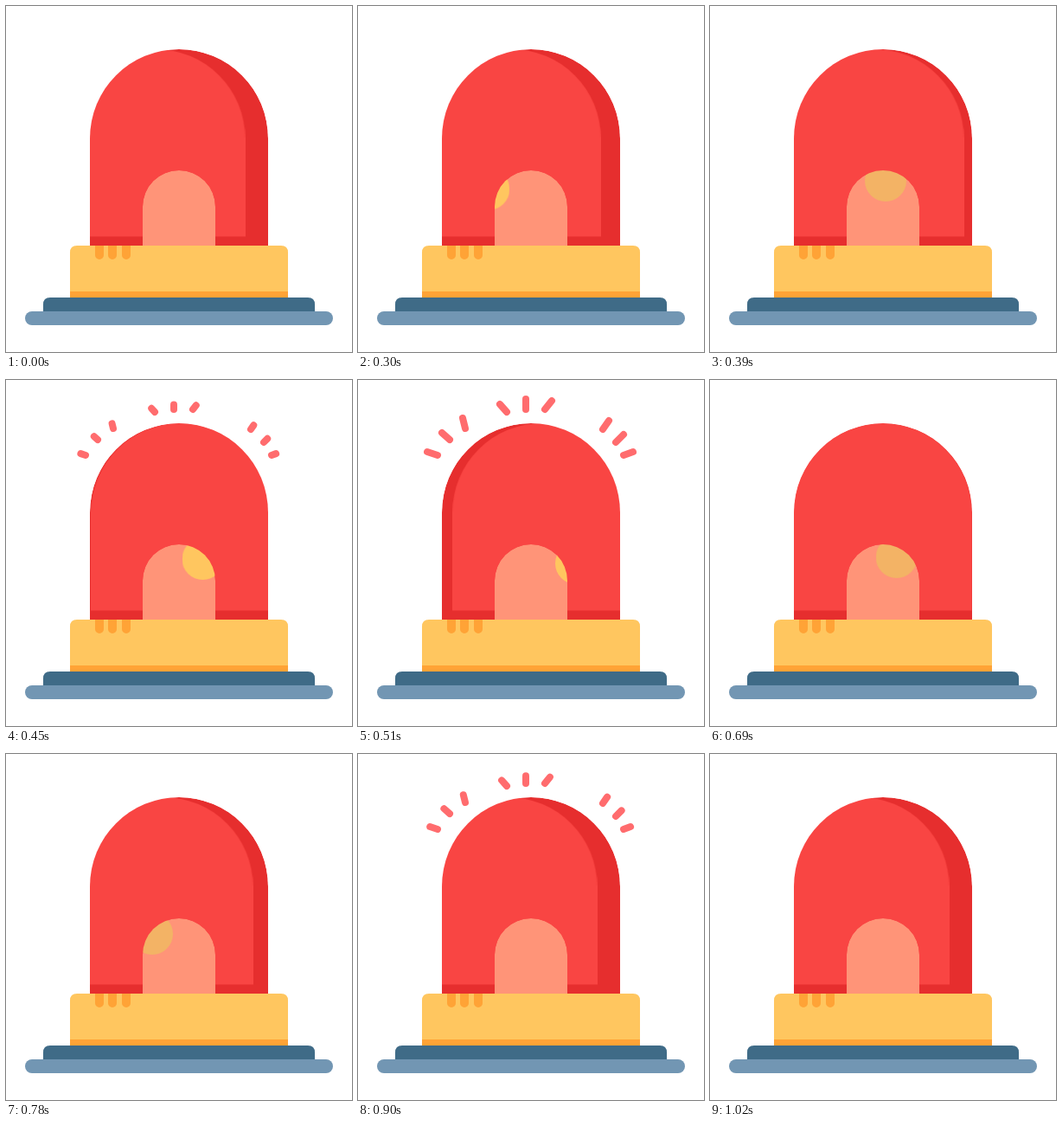
Recreate the animation shown at these times as an HTML page. Size 400x400 px, loop 1.83 s.

```html
<!DOCTYPE html>
<html lang="en">
<head>
<meta charset="utf-8">
<title>Siren</title>
<style>
  html, body { margin: 0; width: 100%; height: 100%; overflow: hidden; background: #fff; }
  svg { display: block; width: 100%; height: 100%; }

  /* The motion advances in 30 ms ticks, 61 per loop. */
  .glass, .lamp, .rays { animation: 1830ms linear -1ms infinite; }
  .glass { animation-name: turn; }
  .lamp { animation-name: sweep, blink; }
  .rays {
    animation-name: burst, show;
    fill: none;
    stroke: #ff6c6e;
    stroke-width: 8;
    stroke-linecap: round;
    stroke-dasharray: 1 2;
  }

  @keyframes turn {
    0% { transform: translateX(-26.5px); }
    14.75% { transform: translateX(-26.5px); animation-timing-function: steps(4); }
    21.31% { transform: translateX(-9.5px); animation-timing-function: steps(4); }
    27.86% { transform: translateX(12.2px); animation-timing-function: steps(2); }
    31.14% { transform: translateX(20px); animation-timing-function: steps(2); }
    34.42% { transform: translateX(11.2px); animation-timing-function: steps(5); }
    42.62% { transform: translateX(-17.5px); animation-timing-function: steps(2); }
    45.9%, 100% { transform: translateX(-26.5px); }
  }

  @keyframes sweep {
    0% { transform: translate(134px, 215px); }
    14.75% { transform: translate(134px, 215px); animation-timing-function: steps(4); }
    21.31% { transform: translate(203px, 202px); animation-timing-function: steps(4); }
    27.86% { transform: translate(252px, 212px); animation-timing-function: steps(2); }
    31.14% { transform: translate(268px, 215px); animation-timing-function: steps(2); }
    34.42% { transform: translate(247px, 211px); animation-timing-function: steps(3); }
    39.34% { transform: translate(200px, 202px); animation-timing-function: steps(2); }
    42.62% { transform: translate(169px, 208px); animation-timing-function: steps(2); }
    45.9%, 100% { transform: translate(134px, 215px); }
  }

  @keyframes blink {
    0%, 24.59% { fill: #ffc65f; animation-timing-function: step-end; }
    19.67%, 31.14% { fill: #f3b365; animation-timing-function: step-end; }
    100% { fill: #f3b365; }
  }

  /* Each ray grows outwards, then leaves from its inner end. */
  @keyframes burst {
    0%, 22.95% { stroke-dashoffset: .8; animation-timing-function: steps(3); }
    27.86% { stroke-dashoffset: 0; animation-timing-function: steps(3); }
    32.78% { stroke-dashoffset: -.8; animation-timing-function: step-end; }
    45.9% { stroke-dashoffset: .8; animation-timing-function: steps(3); }
    50.81% { stroke-dashoffset: 0; animation-timing-function: steps(3); }
    55.73%, 100% { stroke-dashoffset: -.8; }
  }

  @keyframes show {
    0%, 32.78%, 55.73% { opacity: 0; animation-timing-function: step-end; }
    22.95%, 45.9% { opacity: 1; animation-timing-function: step-end; }
    100% { opacity: 0; }
  }
</style>
</head>
<body>
<svg viewBox="0 0 400 400">
  <defs>
    <clipPath id="dome"><path d="M97 277V153a103 103 0 0 1 206 0V277Z"/></clipPath>
    <clipPath id="door"><path d="M158 277V232a42 42 0 0 1 84 0V277Z"/></clipPath>
  </defs>

  <g class="rays">
    <path pathLength="1" d="M92 87L80 83"/>
    <path pathLength="1" d="M106 69L97 61"/>
    <path pathLength="1" d="M124 56L121 44"/>
    <path pathLength="1" d="M172 37L164 28"/>
    <path pathLength="1" d="M194 34V22"/>
    <path pathLength="1" d="M216 34L224 24"/>
    <path pathLength="1" d="M283 57L290 47"/>
    <path pathLength="1" d="M298 72L307 63"/>
    <path pathLength="1" d="M307 87L318 83"/>
  </g>

  <g clip-path="url(#dome)">
    <path fill="#e62e2e" d="M97 277V153a103 103 0 0 1 206 0V277Z"/>
    <path class="glass" fill="#f94543" d="M97 266.5V153a103 103 0 0 1 206 0V266.5Z"/>
  </g>

  <g clip-path="url(#door)">
    <path fill="#ff9478" d="M158 277V232a42 42 0 0 1 84 0V277Z"/>
    <circle class="lamp" r="24"/>
  </g>

  <path fill="#ffc65f" d="M74 337V285q0-8 8-8H318q8 0 8 8V337Z"/>
  <path fill="#ffa336" d="M74 330H326V337H74Z
    M103 277h10v11a5 5 0 0 1-10 0Z
    M118 277h10v11a5 5 0 0 1-10 0Z
    M134 277h10v11a5 5 0 0 1-10 0Z"/>
  <path fill="#3f6b87" d="M43 353V345q0-8 8-8H349q8 0 8 8V353Z"/>
  <rect fill="#7296b3" x="22" y="353" width="356" height="16" rx="8"/>
</svg>
</body>
</html>
```
